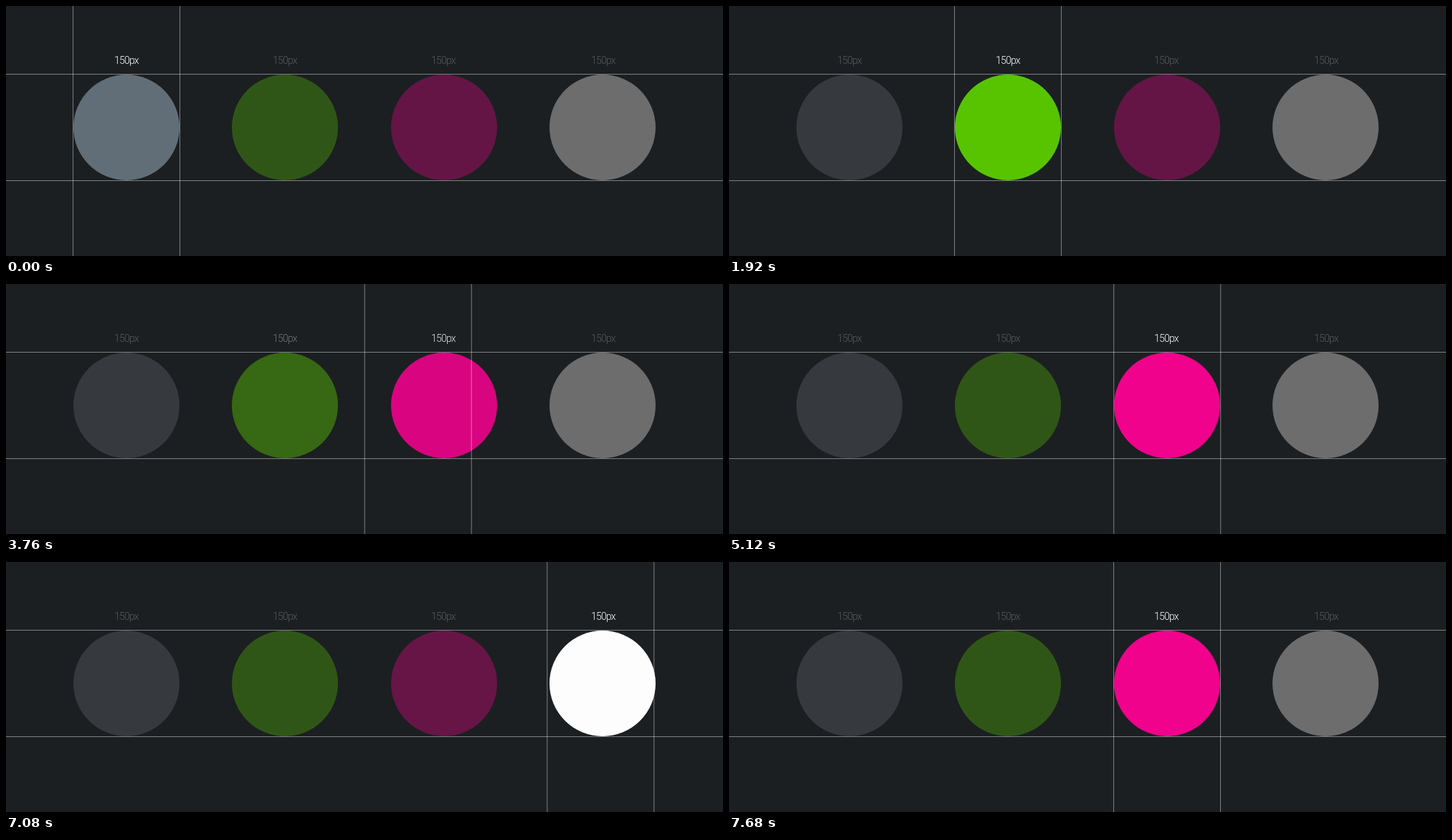
An HTML page with a canvas that plays this animation: 1000 px wide and 350 px high, repeating every 8 s.

```html
<!DOCTYPE html>
<html lang="en">
<head>
<meta charset="utf-8">
<title>Four circles</title>
<style>
html, body { margin: 0; width: 100%; height: 100%; overflow: hidden; background: #1b1f21; }
canvas { display: block; }
</style>
</head>
<body>
<canvas id="stage" width="1000" height="350"></canvas>
<script>
const ctx = document.getElementById('stage').getContext('2d');
const LOOP = 8000, STEP = 40, MOVE = 640;

const circles = [
  { x: 168, label: 168, dim: [54, 58, 62], lit: [97, 110, 119] },
  { x: 389, label: 389, dim: [48, 86, 23], lit: [88, 196, 0] },
  { x: 611, label: 610, dim: [100, 21, 69], lit: [240, 2, 140] },
  { x: 832, label: 833, dim: [109, 109, 110], lit: [255, 255, 255] }
];
const textDim = [86, 89, 91], textLit = [255, 255, 255];

// Start time and the circle to move to
const moves = [[1278, 1], [3195, 2], [5109, 3], [7036, 2]];

const mix = (a, b, p) => a + (b - a) * p;
const color = (a, b, p) => `rgb(${a.map((v, i) => Math.round(mix(v, b[i], p)))})`;

const bezier = (u, a, b) => 3 * u * (1 - u) ** 2 * a + 3 * u * u * (1 - u) * b + u ** 3;

// Soft start, nearly constant speed on arrival
function ease(t) {
  let lo = 0, hi = 1;
  for (let i = 0; i < 24; i++) {
    const mid = (lo + hi) / 2;
    if (bezier(mid, 0.3, 0.88) < t) lo = mid; else hi = mid;
  }
  return bezier(lo, 0, 0.83);
}

function pose(time) {
  let from = 0, to = 0, p = 1;
  for (const [start, target] of moves) {
    if (time < start) break;
    from = to;
    to = target;
    p = time >= start + MOVE ? 1 : ease((time - start) / MOVE);
  }
  return { from, to, p };
}

function draw(time) {
  const { from, to, p } = pose(time);
  ctx.fillStyle = '#1b1f21';
  ctx.fillRect(0, 0, 1000, 350);

  ctx.font = '300 14px Roboto, sans-serif';
  ctx.letterSpacing = '-0.8px';
  ctx.textAlign = 'center';
  circles.forEach((c, i) => {
    const glow = i === to ? p : i === from ? 1 - p : 0;
    ctx.fillStyle = color(c.dim, c.lit, glow);
    ctx.beginPath();
    ctx.arc(c.x, 170, 74, 0, 2 * Math.PI);
    ctx.fill();
    ctx.fillStyle = color(textDim, textLit, glow);
    ctx.fillText('150px', c.label, 81);
  });

  const x = mix(circles[from].x, circles[to].x, p);
  ctx.fillStyle = 'rgba(255, 255, 255, 0.43)';
  for (const y of [95, 244]) ctx.fillRect(0, y, 1000, 1);
  for (const side of [-75, 74]) ctx.fillRect(x + side, 0, 1, 350);
}

const begin = performance.now();
function tick() {
  const time = (performance.now() - begin) % LOOP;
  draw(Math.floor(time / STEP) * STEP);
  requestAnimationFrame(tick);
}
tick();
</script>
</body>
</html>
```
